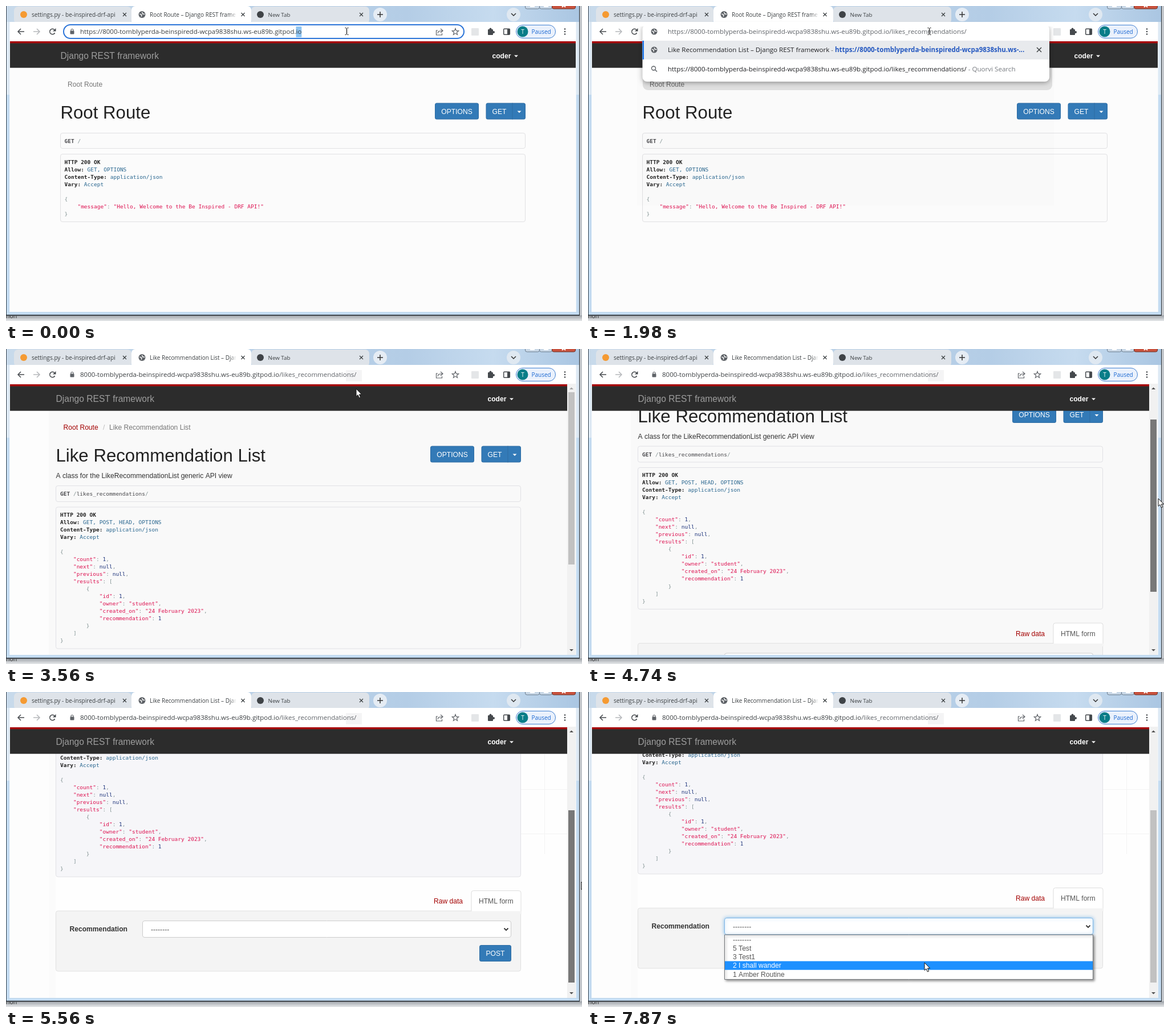
An HTML page with a canvas for the animation above (8000 ms loop, 1010 by 554 pixels).

```html
<!DOCTYPE html>
<html lang="en">
<head>
<meta charset="utf-8">
<title>API walkthrough</title>
<style>
  html, body { margin: 0; width: 100%; height: 100%; overflow: hidden; background: #fff; }
  canvas { display: block; }
</style>
</head>
<body>
<canvas id="stage" width="1010" height="554"></canvas>
<script>
const ctx = document.getElementById('stage').getContext('2d');
const LOOP = 8000;
const UI = '"Open Sans", sans-serif';
const SANS = '"Liberation Sans", Arial, sans-serif';
const MONO = '9.53px "DejaVu Sans Mono", monospace';
const BODY = '12.1px ' + SANS;
const URL_FONT = '11.5px ' + UI;
const TITLE_FONT = '11.6px ' + UI;
const TAB_FONT = '10px ' + UI;
const HOST = '8000-tomblyperda-beinspiredd-wcpa9838shu.ws-eu89b.gitpod.io';
const PATH = '/likes_recommendations/';
const INK = '#202124', GREY = '#5f6368', BLUE = '#337ab7';

function rect(x, y, w, h, fill) {
  ctx.fillStyle = fill;
  ctx.fillRect(x, y, w, h);
}

function box(x, y, w, h, r, fill, stroke, lineWidth = 1) {
  ctx.beginPath();
  ctx.roundRect(x, y, w, h, r);
  if (fill) { ctx.fillStyle = fill; ctx.fill(); }
  if (stroke) { ctx.strokeStyle = stroke; ctx.lineWidth = lineWidth; ctx.stroke(); }
}

function disc(x, y, r, fill) {
  ctx.beginPath();
  ctx.arc(x, y, r, 0, Math.PI * 2);
  ctx.fillStyle = fill;
  ctx.fill();
}

function text(str, x, y, font, color, align = 'left') {
  ctx.font = font;
  ctx.fillStyle = color;
  ctx.textAlign = align;
  ctx.fillText(str, x, y);
  return x + ctx.measureText(str).width;
}

function trace(points, color, width = 1.4) {
  ctx.beginPath();
  for (const [x, y] of points) ctx.lineTo(x, y);
  ctx.strokeStyle = color;
  ctx.lineWidth = width;
  ctx.stroke();
}

function shape(points, fill) {
  ctx.beginPath();
  for (const [x, y] of points) ctx.lineTo(x, y);
  ctx.closePath();
  ctx.fillStyle = fill;
  ctx.fill();
}

function cross(x, y, r, color, width) {
  trace([[x - r, y - r], [x + r, y + r]], color, width);
  trace([[x + r, y - r], [x - r, y + r]], color, width);
}

function caretDown(x, y, r, color) {
  shape([[x - r, y], [x + r, y], [x, y + r]], color);
}

function clipped(x, y, w, h, draw) {
  ctx.save();
  ctx.beginPath();
  ctx.rect(x, y, w, h);
  ctx.clip();
  draw();
  ctx.restore();
}

// Moves between keys in small jumps, like a screen recording.
function track(t, keys, step = 65) {
  if (t <= keys[0][0]) return keys[0].slice(1);
  for (let i = 1; i < keys.length; i++) {
    const [t0, ...a] = keys[i - 1], [t1, ...b] = keys[i];
    if (t < t1) {
      const p = Math.floor((t - t0) / step) * step / (t1 - t0);
      return a.map((v, k) => v + (b[k] - v) * p);
    }
  }
  return keys[keys.length - 1].slice(1);
}

const POINTER = [
  [3560, 614, 70], [3630, 735, 160], [3710, 858, 241], [3970, 872, 240],
  [4440, 989, 215], [4630, 990, 215], [4740, 1000, 263], [5130, 1008, 320],
  [5360, 1008, 325], [5560, 1009, 334], [6040, 1006, 331], [6450, 737, 396],
  [6710, 768, 410], [7510, 762, 414], [7870, 590, 476]
];
const SCROLL = [[4630, 0], [4740, 69.5], [5130, 186], [5360, 186], [5560, 202], [5630, 207]];

function globe(x, y, r) {
  disc(x, y, r, GREY);
  trace([[x - r * .7, y - r * .2], [x - r * .1, y + r * .1], [x - r * .2, y + r * .6]], '#fff', 1.4);
  trace([[x, y - r * .7], [x + r * .2, y - r * .2], [x + r * .8, y - r * .1]], '#fff', 1.4);
}

function lock(x, y) {
  box(x - 3.5, y - 1.5, 7, 6, 1, GREY);
  box(x - 2, y - 4.5, 4, 5, 2, null, GREY, 1.2);
}

function desktop() {
  rect(0, 0, 1010, 554, '#c3c7cc');
  const shade = ctx.createLinearGradient(0, 544, 0, 554);
  shade.addColorStop(0, '#9da2a8');
  shade.addColorStop(1, '#e6e8ea');
  rect(0, 544, 1010, 10, shade);
  clipped(0, 545, 60, 9, () => text('hon', 0, 549, '10.5px ' + UI, '#222'));
  rect(0, 0, 1006, 544, '#c3dbf1');
  rect(1, 28, 6, 128, '#dde9f4');
  rect(999, 28, 6, 128, '#dde9f4');
  rect(0, 0, 1, 544, '#3c4650');
  rect(1005, 0, 1, 544, '#30363c');
  rect(0, 543, 1006, 1.5, '#20262c');
  rect(6, 28, 1, 510, '#eef4fa');
  rect(999, 28, 1, 510, '#eef4fa');
}

function tabStrip(title) {
  const sky = ctx.createLinearGradient(0, 0, 1005, 0);
  sky.addColorStop(0, '#c8daeb');
  sky.addColorStop(.7, '#b4cde6');
  sky.addColorStop(.85, '#c6dbef');
  sky.addColorStop(1, '#aac6e2');
  rect(1, 0, 1004, 28, sky);
  box(14, 1, 206, 30, 7, '#dee3e9');
  box(430, 1, 207, 30, 7, '#dee3e9');
  rect(7, 28, 992, 33, '#fff');
  box(220, 0, 210, 30, [7, 7, 0, 0], '#fff');

  disc(31, 15, 6, '#f59a32');
  globe(238.5, 15, 6);
  disc(446, 15, 6, '#3f4347');
  clipped(40, 0, 153, 28, () => text('settings.py - be-inspired-drf-api', 45, 18.5, '10.1px ' + UI, '#3c4043'));
  clipped(250, 0, 153, 28, () => text(title, 252, 18.5, TAB_FONT, '#3c4043'));
  const fade = ctx.createLinearGradient(392, 0, 404, 0);
  fade.addColorStop(0, 'rgba(255,255,255,0)');
  fade.addColorStop(1, '#fff');
  rect(392, 5, 12, 20, fade);
  text('New Tab', 459.5, 18.5, '9.8px ' + UI, '#3c4043');
  for (const x of [208, 415.5, 623]) cross(x, 15, 3, '#3c4043', 1.3);

  disc(656, 15, 12, '#e5ecf4');
  trace([[651, 15], [661, 15]], '#333', 1.5);
  trace([[656, 10], [656, 20]], '#333', 1.5);
  disc(890, 15, 12, '#dfe8f1');
  trace([[886, 13], [890, 17], [894, 13]], '#333', 1.5);

  box(910.5, -6, 25, 11, 3, '#c9d8e7', '#6b7c8e');
  box(935.5, -6, 22, 11, 3, '#c9d8e7', '#6b7c8e');
  box(957.5, -6, 41, 11, 3, '#c9523d', '#6d3428');
  rect(919, 0, 8, 2, '#fff');
  rect(943, 0, 8, 2, '#fff');
  cross(978, -1, 3, '#fff', 2);
}

function toolbarIcons() {
  const dark = '#45494d';
  trace([[32, 45], [21, 45]], dark, 1.5);
  trace([[26, 40], [21, 45], [26, 50]], dark, 1.5);
  trace([[48, 45], [59, 45]], '#b5b7ba', 1.5);
  trace([[54, 40], [59, 45], [54, 50]], '#b5b7ba', 1.5);
  ctx.beginPath();
  ctx.arc(81.5, 45, 4.7, .5, 5.5);
  ctx.strokeStyle = dark;
  ctx.lineWidth = 1.6;
  ctx.stroke();
  shape([[87.5, 39], [87.5, 44.5], [82, 44.5]], dark);

  box(816, 39, 13, 13, 1, '#e4e6e8');
  box(845, 41, 9, 10, 1, dark);
  disc(849.5, 40.5, 2, dark);
  disc(855, 46, 2, dark);
  box(872.7, 40.2, 10.6, 10, 1, null, dark, 1.5);
  rect(879, 40, 4, 10, dark);
  box(894.5, 33.5, 69, 23, 11.5, '#eaf1fc', '#3f7fd0');
  disc(906, 45, 9.5, '#087d88');
  text('T', 906, 48.5, TAB_FONT, '#fff', 'center');
  text('Paused', 921.5, 48.7, '10px ' + UI, '#1967d2');
  for (const y of [40.5, 45, 49.5]) disc(980, y, 1.3, dark);
}

function shareAndStar() {
  trace([[757, 43], [754.5, 43], [754.5, 51], [764.5, 51], [764.5, 48]], GREY, 1.2);
  trace([[757, 48], [758.5, 44.5], [765, 43.5]], GREY, 1.2);
  trace([[762, 40], [766, 43.5], [762, 47]], GREY, 1.2);
  ctx.beginPath();
  for (let i = 0; i < 10; i++) {
    const a = i * Math.PI / 5 - Math.PI / 2, r = i % 2 ? 2.6 : 6;
    ctx.lineTo(788 + r * Math.cos(a), 45.5 + r * Math.sin(a));
  }
  ctx.closePath();
  ctx.strokeStyle = GREY;
  ctx.lineWidth = 1.2;
  ctx.stroke();
}

function addressBar(t) {
  const focused = t < 1020;
  if (focused) box(101, 33, 702, 24, 12, '#fff', '#2b74d8', 2);
  else rect(596, 37, 28, 20, '#f4f4f5');
  lock(116, 45);
  shareAndStar();
  if (!focused) {
    const end = text(HOST, 130, 49, URL_FONT, '#3c4043');
    text(PATH, end, 49, URL_FONT, GREY);
    return;
  }
  const full = 'https://' + HOST;
  if (t < 300) {
    ctx.font = URL_FONT;
    const ioStart = 130 + ctx.measureText(full.slice(0, -2)).width;
    rect(ioStart, 36, ctx.measureText('io').width, 19, '#8fc5f3');
  }
  const end = text(full, 130, 49, URL_FONT, '#3c4043');
  if (t >= 300 && t < 850) rect(Math.round(end), 36, 1, 16, '#111');
}

function suggestion(title, y) {
  globe(116, y, 5.5);
  clipped(130, y - 15, 642, 30, () => {
    let x = text(title + ' – Django REST framework', 140, y + 4, TITLE_FONT, INK);
    x = text(' - ', x, y + 4, TITLE_FONT, GREY);
    const url = ('https://' + HOST).slice(0, 52) + '...';
    text(url, x, y + 4, 'bold ' + URL_FONT, '#2458c0');
  });
}

function popup(t) {
  const wide = t < 1390;
  const bottom = wide ? 335 : 133;
  rect(86, 109, 731, 242, 'rgba(0,0,0,.008)');
  if (!wide) box(96, 109, 718, 39, [0, 0, 9, 9], 'rgba(0,0,0,.11)');
  ctx.save();
  ctx.shadowColor = 'rgba(0,0,0,.35)';
  ctx.shadowBlur = 8;
  ctx.shadowOffsetY = 2;
  box(95.5, 33, 713.5, bottom - 33, 8, '#fff');
  ctx.restore();
  rect(90, 28, 726, 8, '#fff');
  rect(95.5, 61, 713.5, 33, '#e8eaed');
  rect(95.5, 61, 2.5, 33, '#1a73e8');
  globe(116, 45, 5.5);

  const typed = 'https://' + HOST + (wide ? '/' : PATH);
  const end = text(typed, 140, 49, URL_FONT, GREY);
  if (t < 1980) rect(Math.round(end), 36, 1, 16, '#111');
  cross(791, 77, 4, '#3c4043', 1.4);
  if (wide) {
    const titles = ['Root Route', 'Like Recommendation List', 'Recommendation List', 'Comment List',
      'Profile List', 'Follower List', 'Root Route', 'Like List'];
    titles.forEach((title, i) => suggestion(title, 77 + i * 33));
    return;
  }
  suggestion('Like Recommendation List', 77);
  ctx.beginPath();
  ctx.arc(115, 109.5, 3.5, 0, 7);
  ctx.strokeStyle = GREY;
  ctx.lineWidth = 1.4;
  ctx.stroke();
  trace([[117.5, 112], [121, 115.5]], GREY, 1.5);
  const x = text(typed, 140, 114.5, URL_FONT, INK);
  text(' - Quorvi Search', x, 114.5, TITLE_FONT, '#777b80');
}

function codeLine(line, x, y) {
  ctx.font = MONO;
  const charWidth = ctx.measureText('0').width;
  const header = line.match(/^([A-Z][\w-]+:)(.*)/);
  if (header) {
    text(header[1], x, y, 'bold ' + MONO, '#222');
    text(header[2], x + header[1].length * charWidth, y, MONO, '#28668f');
    return;
  }
  if (line.startsWith('HTTP')) {
    text(line, x, y, 'bold ' + MONO, '#222');
    return;
  }
  for (const m of line.matchAll(/"[^"]*"|null|\d+|[^\s\w"]+/g)) {
    const color = m[0][0] === '"' ? '#dd1150' : /\w/.test(m[0]) ? '#1e347b' : '#849494';
    text(m[0], x + m.index * charWidth, y, MONO, color);
  }
}

function requestLine(path, x, y) {
  const end = text('GET ', x, y, 'bold ' + MONO, '#48484c');
  let at = end;
  for (const part of path.split(/(\/)/)) at = text(part, at, y, MONO, part === '/' ? '#849494' : '#48484c');
}

function codeBlock(lines, x, y) {
  lines.forEach((line, i) => codeLine(line, x, y + i * 13.02));
}

function button(x, y, w, label) {
  box(x, y, w, 29, 3.5, '#2e6da4');
  box(x + 1, y + 1, w - 2, 27, 2.5, BLUE);
  text(label, x + w / 2, y + 19, BODY, '#fff', 'center');
}

function heading(title, x) {
  const top = 170.5;
  text(title, x, 198, '31.2px ' + SANS, '#222');
  button(x + 656.5, top, 77, 'OPTIONS');
  button(x + 746, top, 69.5, '');
  rect(x + 792, top, 1, 29, '#2e6da4');
  text('GET', x + 769.5, top + 19, BODY, '#fff', 'center');
  caretDown(x + 804.5, 184.5, 3.5, '#fff');
}

function navbar(x, right) {
  rect(7, 61, right - 7, 1, '#fff');
  rect(7, 62, right - 7, 4, '#a80a0e');
  rect(7, 65.5, right - 7, 43.2, '#2c2c2c');
  text('Django REST framework', x, 92.5, '15.6px ' + SANS, '#9d9d9d');
  text('coder', x + 757, 91.5, 'bold ' + BODY, '#fff');
  caretDown(x + 799, 86.5, 3.5, '#fff');
}

const ROOT_REPLY = ['HTTP 200 OK', 'Allow: GET, OPTIONS', 'Content-Type: application/json', 'Vary: Accept', '',
  '{', '    "message": "Hello, Welcome to the Be Inspired - DRF API!"', '}'];
const LIST_REPLY = ['HTTP 200 OK', 'Allow: GET, POST, HEAD, OPTIONS', 'Content-Type: application/json',
  'Vary: Accept', '', '{', '    "count": 1,', '    "next": null,', '    "previous": null,', '    "results": [',
  '        {', '            "id": 1,', '            "owner": "student",',
  '            "created_on": "24 February 2023",', '            "recommendation": 1', '        }', '    ]', '}'];

function rootPage() {
  const x = 95.5;
  rect(7, 61, 992, 477, '#fcfcfc');
  text('Root Route', 108, 142, BODY, '#777');
  heading('Root Route', x);
  box(x, 223.5, 815, 27, 3.5, '#fbfbfb', '#e1e1e3');
  requestLine('/', 102.5, 240.5);
  box(x, 260.5, 815, 119, 3.5, '#fbfbfb', '#e1e1e3');
  codeBlock(ROOT_REPLY, 102.5, 277.5);
  navbar(x, 999);
}

function selectBox(t, y) {
  ctx.save();
  if (t >= 7080) {
    ctx.shadowColor = 'rgba(102,175,233,' + (t < 7140 ? .3 : .8) + ')';
    ctx.shadowBlur = 6;
  }
  box(239.5, y, 646, 29, 3.5, '#fff', t < 7080 ? '#ccc' : '#7fb6e6');
  ctx.restore();
  text('--------', 254, y + 19, BODY, '#555');
  trace([[873.5, y + 13], [877, y + 16.5], [880.5, y + 13]], '#333', 1.8);
}

function listPage(t, scroll) {
  const x = 87.5;
  const settled = t >= 4860;
  const paper = settled ? '#fefefe' : '#f9f9f9';
  const panel = settled ? '#f6f6f9' : '#f9f9f9';
  rect(7, 61, 977, 477, '#fdfdfd');
  rect(75, 61, 909, 477, paper);
  if (settled) {
    rect(75, 109, 12, 429, '#fbfbfb');
    rect(944, 109, 1, 176, '#f3f3f3');
    rect(903, 171, 81, 1, '#f3f3f3');
    rect(903, 249, 81, 1, '#f3f3f3');
  }
  ctx.save();
  ctx.translate(0, -scroll);
  text('Root Route', 100.5, 142, BODY, '#a30000');
  text('/', 170, 142, BODY, '#bbb');
  text('Like Recommendation List', 181, 142, BODY, '#777');
  heading('Like Recommendation List', x);
  text('A class for the LikeRecommendationList generic API view', x, 227, BODY, '#333');
  box(x, 240.5, 815, 28, 3.5, panel, '#e1e1e5');
  requestLine(PATH, 95, 258);
  box(x, 278, 815, 249, 3.5, panel, '#e1e1e5');
  codeBlock(LIST_REPLY, 95, 294.7);

  box(x, 587, 815, 106, 3.5, '#f4f4f4', '#e1e1e1');
  box(816, 551.5, 87, 40, [3.5, 3.5, 0, 0], '#fff', '#ddd');
  rect(815, 587.5, 89, 5, '#f4f4f4');
  text('Raw data', 750, 574, BODY, '#a30000');
  text('HTML form', 829, 574, BODY, '#555');
  text('Recommendation', 111.5, 623, 'bold ' + BODY, '#333');
  selectBox(t, 604.5);
  button(830, 647, 56, 'POST');
  ctx.restore();
  navbar(x, 984);
  scrollbar(t, scroll);
}

function scrollbar(t, scroll) {
  rect(984, 61, 15, 477, '#f1f1f1');
  const color = t >= 4630 && t < 5860 ? '#787878' : t >= 4370 && t < 4630 ? '#a8a8a8' : '#c1c1c1';
  rect(986, Math.round(76 + Math.min(131.5, scroll * .69)), 11, 303, color);
  shape([[988, 71], [995, 71], [991.5, 67.5]], scroll ? '#505050' : '#a3a3a3');
  caretDown(991.5, 528, 3.5, '#505050');
}

function optionList(pointerY) {
  const options = ['--------', '5 Test', '3 Test1', '2 I shall wander', '1 Amber Routine'];
  const top = 427.5, pitch = 15.3;
  const active = Math.max(0, Math.floor((pointerY - top) / pitch));
  ctx.save();
  ctx.shadowColor = 'rgba(0,0,0,.4)';
  ctx.shadowBlur = 4;
  ctx.shadowOffsetX = ctx.shadowOffsetY = 2;
  box(239.5, top - .5, 646, 78.5, 0, '#fff', '#707478');
  ctx.restore();
  options.forEach((label, i) => {
    const y = top + i * pitch;
    if (i === active) rect(240, y, 645, pitch, '#1e90ff');
    text(label, 254, y + 12, BODY, i === active ? '#fff' : '#555');
  });
}

function arrow(x, y) {
  const points = [[0, 0], [0, 13.5], [3, 10.7], [5.3, 16], [7.6, 15], [5.4, 9.9], [9.6, 9.9]]
    .map(([px, py]) => [x + px, y + py]);
  shape(points, '#fff');
  trace([...points, points[0]], '#111', 1);
}

function beam(x, color) {
  trace([[x, 39], [x, 50]], color, 1.2);
  for (const y of [38.5, 50.5]) {
    trace([[x - 3, y], [x - 1, y]], color, 1);
    trace([[x + 1, y], [x + 3, y]], color, 1);
  }
}

function draw(t) {
  const loaded = t >= 2380;
  const [pointerX, pointerY] = track(t, POINTER);
  desktop();
  tabStrip((t >= 2310 ? 'Like Recommendation List' : 'Root Route') + ' – Django REST framework');
  toolbarIcons();
  clipped(7, 61, 992, 477, () => loaded ? listPage(t, track(t, SCROLL)[0]) : rootPage());
  if (t >= 1020 && t < 2240) popup(t);
  else addressBar(t);
  if (t >= 7080) optionList(pointerY);
  if (t < 3560) beam(t < 60 ? 597.5 : 598.5, '#111');
  else arrow(pointerX, pointerY);
}

function tick() {
  draw(performance.now() % LOOP);
  requestAnimationFrame(tick);
}
tick();
</script>
</body>
</html>
```
